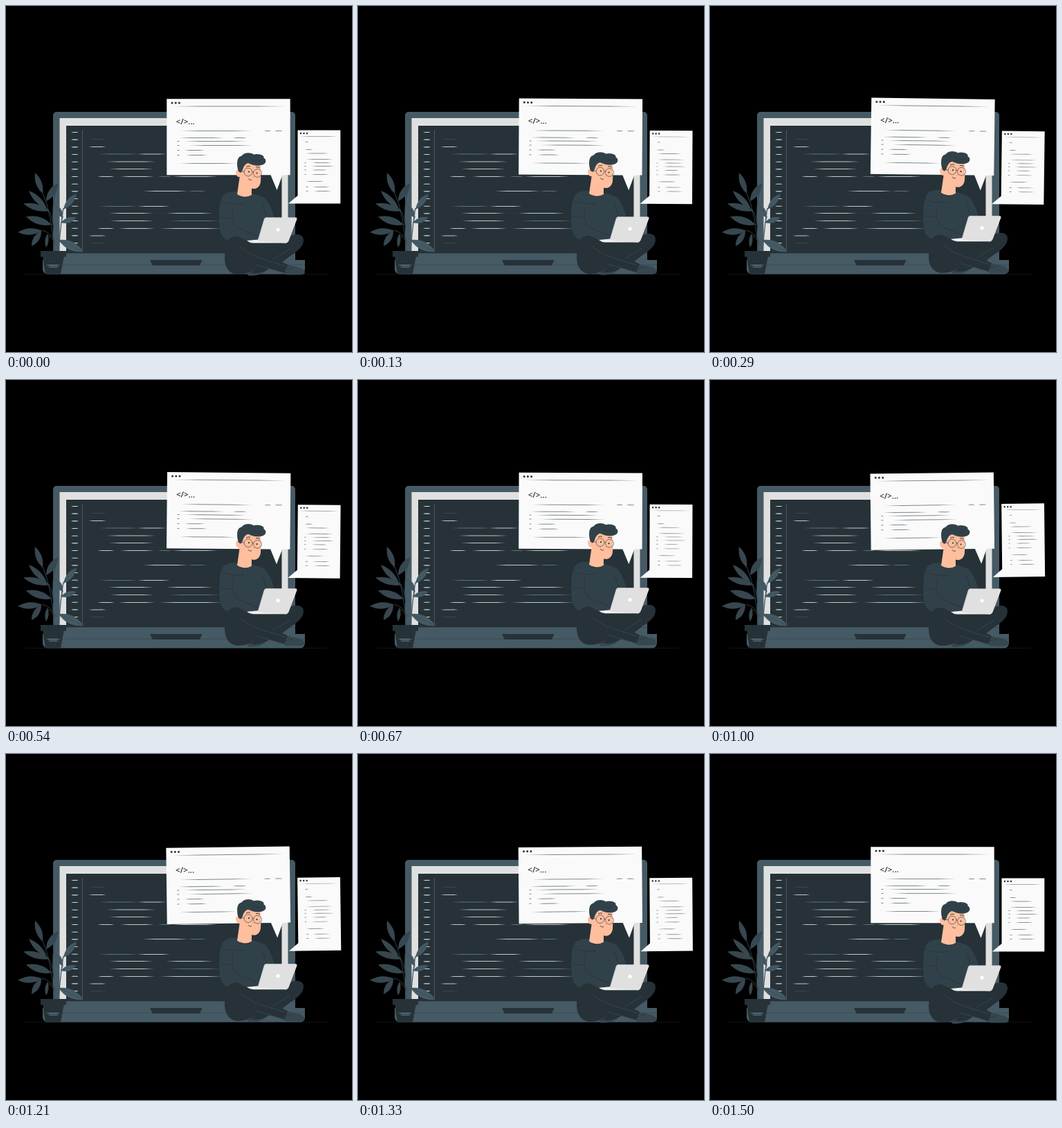
Recreate the animation shown at these times as an HTML page with a canvas. Size 500 px wide and 500 px high, loop 1.54 s.

```html
<!DOCTYPE html>
<html lang="en">
<head>
<meta charset="utf-8">
<title>Developer at work</title>
<style>
html, body { margin: 0; width: 100%; height: 100%; overflow: hidden; background: #000; }
canvas { display: block; width: 100vw; height: 100vh; }
</style>
</head>
<body>
<canvas id="stage" width="500" height="500"></canvas>
<script>
const ctx = document.getElementById('stage').getContext('2d');
const LOOP = 1540, STEP = 1000 / 24, PERIOD = 1500;
const INK = '#263238', SLATE = '#37474f', STEEL = '#455a64', WOOL = '#314149';
const PALE = '#e0e0e0', PAPER = '#fafafa', SKIN = '#ffbe9d';

function fill(d, color) {
  ctx.fillStyle = color;
  ctx.fill(new Path2D(d));
}

function stroke(d, color, width = 0.8) {
  ctx.strokeStyle = color;
  ctx.lineWidth = width;
  ctx.stroke(new Path2D(d));
}

function box(x, y, w, h, color, radius = 0) {
  ctx.fillStyle = color;
  ctx.beginPath();
  ctx.roundRect(x, y, w, h, radius);
  ctx.fill();
}

function dot(x, y, r, color) {
  ctx.fillStyle = color;
  ctx.beginPath();
  ctx.arc(x, y, r, 0, Math.PI * 2);
  ctx.fill();
}

// A row is "y x1-x2 x1-x2 ..."; every span thins out towards its ends
function rows(list, color, half = 0.55) {
  for (const row of list) {
    const [y, ...spans] = row.split(' ');
    for (const span of spans) {
      const [from, to] = span.split('-').map(Number);
      const inset = (to - from) / 4;
      fill(`M${from} ${y}L${from + inset} ${y - half}H${to - inset}L${to} ${y}L${to - inset} ${+y + half}H${from + inset}Z`, color);
    }
  }
}

// Pointed leaf between two ends; fat is its half width
function leaf(x1, y1, x2, y2, fat, color = SLATE) {
  const mx = (x1 + x2) / 2, my = (y1 + y2) / 2;
  const len = Math.hypot(x2 - x1, y2 - y1);
  const nx = -(y2 - y1) / len * fat * 2, ny = (x2 - x1) / len * fat * 2;
  fill(`M${x1} ${y1}Q${mx + nx} ${my + ny} ${x2} ${y2}Q${mx - nx} ${my - ny} ${x1} ${y1}Z`, color);
}

function drawComputer() {
  stroke('M27 387.5H464', '#14191c', 0.8);
  box(68, 153, 350, 216, STEEL, [5, 5, 0, 0]);
  box(77.5, 162, 330, 195, PALE);
  box(87, 173, 311.5, 184, INK);
  box(53, 367, 379, 20.5, STEEL, [0, 0, 7, 7]);
  box(68, 357, 350, 11, STEEL);
  stroke('M68 357.5H418M54 374H432', SLATE, 0.7);
  fill('M208 367H283.5L280 375H212Z', INK);

  stroke('M110.5 179V355', '#526069', 0.8);
  for (let i = 0; i < 16; i++) rows([`${182.5 + i * 10.67} 94-105`], '#d8dcde');
  rows(['192.5 120-145', '342.5 120-145'], SLATE);
  rows(['214 135-192', '289.5 135-190', '267.5 263-290', '310.5 235-310', '246.5 220-240'], '#60727b');
  rows(['203.5 119-145', '214 190-232', '225 145-217', '235.5 149-213',
    '246.5 132-157 165-214 240-306', '267.5 198-263', '289.5 190-237',
    '299.5 148-213 231-299', '310.5 150-214', '321.5 132-157 163-215 222-312',
    '332 119-145'], '#c3c9cb');
}

function drawPlant() {
  stroke('M53 270Q66 300 70 355M59 293Q67 300 68 318M75 257Q64 290 69 322M52 324Q66 328 71 340M60 331Q67 334 71 344', SLATE, 0.9);
  stroke('M83 292Q79 315 76 355M82 304L80 313', STEEL, 1.3);
  leaf(42, 241, 53, 271, 4.2);
  leaf(33, 267, 59, 293, 4.2);
  leaf(75, 256, 58, 282, 4.8);
  leaf(25, 285.5, 63, 296, 4.8);
  leaf(29, 304.5, 66, 316, 5.2);
  leaf(17, 327, 52, 325, 4.6);
  leaf(37, 347, 51, 325, 4.2);
  leaf(58, 349, 60, 329, 2.6);
  leaf(102, 271, 83, 294, 4.2, STEEL);
  leaf(102, 306, 79, 313, 3.7, STEEL);
  leaf(71, 287, 82, 306, 4.2, STEEL);
  leaf(76, 338, 112, 355, 6, STEEL);
  stroke('M102 271L83 294M102 306L79 313M71 287L82 306M76 338L112 355', SLATE, 0.5);
  fill('M53 361H84L79 387H57Z', INK);
  box(50, 354, 37, 8.5, INK);
  rows(['374.5 57-79', '377 60-77'], '#78909c');
}

function drawWindows(angle) {
  ctx.save();
  ctx.translate(357.5, 210);
  ctx.rotate(angle * Math.PI / 180);
  ctx.translate(-357.5, -210);

  fill('M232.3 134.2H410.7V244.3H399.5L391.5 266L382.5 244.3H232.3Z', PAPER);
  for (const x of [240, 245.2, 250.4]) dot(x, 140, 1.5, INK);
  rows(['145 240-404'], '#7d868a', 0.5);
  ctx.fillStyle = INK;
  ctx.font = '600 11.5px "Open Sans", "Noto Sans", sans-serif';
  ctx.fillText('</>...', 245.6, 170.5);
  rows(['180.5 252-355 373-383 388-400', '190.5 250-315 328-348',
    '195.5 247-251 257-348', '201.5 247-251 264-357', '208.5 247-251 258-287',
    '215.5 247-251 260-291', '227.5 251-333'], '#7d878c', 0.5);

  fill('M421.5 179.6H483.3V285.5H408L421.5 274Z', PAPER);
  for (const x of [426, 430.5, 435]) dot(x, 184, 1.25, INK);
  rows(['188.5 424-480'], '#a0a8ab', 0.4);
  rows(['196.5 432-437', '207.5 432-443', '213 433-467', '221.5 433-473',
    '226.5 431-434 442-470', '231.5 431-434 441-475', '237 431-434 442-464',
    '243.5 431-434 441-467', '253.5 433-460', '261.5 433-437 443-468',
    '267.5 433-437 445-470'], '#8a9498', 0.45);
  ctx.restore();
}

function drawHead() {
  fill('M337 234L346 225H367Q369 238 368 254C367 262 361 265.5 355 263.5L355 273Q345 279 334 272L337.5 248Z', SKIN);
  fill('M339 237C333 235 331 239 332.5 243C334 247.5 337 248 340 246Z', SKIN);
  fill('M336 239C333 230 333 218 340 217C345 211 353 211.5 358 214.5C366 212.5 374 216 372.5 219.5C377.5 222 376 229 369 230C361 232 355 229 350 227C345 228 343 233 341.5 238L339 241Z', WOOL);
  stroke('M354 221Q361 226 369 223', INK, 0.5);
  stroke('M339 239L344 239.5M356 240Q357 239 358 240.5', INK, 0.6);
  ctx.lineWidth = 0.6;
  for (const [x, y] of [[350, 240], [363.5, 241.5]]) {
    ctx.beginPath();
    ctx.arc(x, y, 5.9, 0, Math.PI * 2);
    ctx.stroke();
  }
  dot(351, 239.5, 1.1, INK);
  dot(362.5, 241.5, 1.1, INK);
  stroke('M347 232.5Q349.5 230.5 353 231.5M361 233Q364 231.8 367 234', INK, 0.9);
  stroke('M357 242L359 247H356.5', '#d9957a', 0.7);
  stroke('M350 249.5Q352 252.5 355 251', INK, 0.8);
}

function drawPerson(rise) {
  ctx.save();
  ctx.translate(0, -rise);

  // Torso and arms
  fill('M333 268C324 268 317 269 313 275C307 286 308 305 309 322C310 332 315 337 322 340H372L388 306C383 290 378 278 369 275L356 271Q350 278 343 277Q336 275 333 268Z', WOOL);
  stroke('M327 292Q326 312 333 320L364 333M311 282Q325 288 344 286M371 287L376 304M310 305Q318 308 326 306', INK, 0.7);

  // Crossed legs and feet
  fill('M349 387L370 372L381 379L371 386Q360 391 350 389.5Z', SLATE);
  fill('M396 342C409 331 423 326 429 334C433 344 424 353 411 361L398 371L372 384Q360 388 354 385L380 358Z', INK);
  fill('M403 373L420 377Q431 379 432 385Q431 388.5 424 388.5H405L398 384Z', SLATE);
  fill('M317 348C317 338 326 332 335 333L352 341L395 343L411 353L392 366L407 374L402 386L364 375C356 384 348 388 336 388C323 388 316 378 316 364Z', INK);
  stroke('M337 347Q348 357 366 364L404 376M402 386L362 374M411 351L386 366', '#425159', 0.6);
  stroke('M404 381Q412 380 417 377M352 386Q360 385 368 377', INK, 0.6);

  // Notebook
  fill('M348 339L365 337.5L405 341V342.6H357Q352 342.3 348 339Z', '#f0f0f0');
  fill('M376 305.5H418Q421.3 305.5 420.3 308.5L408.5 339.5Q407 342.6 404 342.6L366 340Q363.5 339 364.5 336.5L373 308Q374 305.5 376 305.5Z', PALE);
  stroke('M364.5 338L373.3 308Q374 305.8 376 305.8', '#c7c7c7', 0.6);
  dot(393, 323, 2.6, '#fff');

  drawHead();
  ctx.restore();
}

function draw(now) {
  const frame = Math.floor((now % LOOP + 4) / STEP);
  const phase = Math.min(frame, 36) * STEP / PERIOD % 1;
  const triangle = p => 1 - Math.abs(2 * (p % 1) - 1);
  ctx.fillStyle = '#000';
  ctx.fillRect(0, 0, 500, 500);
  drawComputer();
  drawPlant();
  drawWindows(0.95 * (2 * triangle(phase + 0.25) - 1));
  drawPerson(6 * triangle(phase));
}

const start = performance.now();
function tick() {
  draw(performance.now() - start);
  requestAnimationFrame(tick);
}
tick();
</script>
</body>
</html>
```
